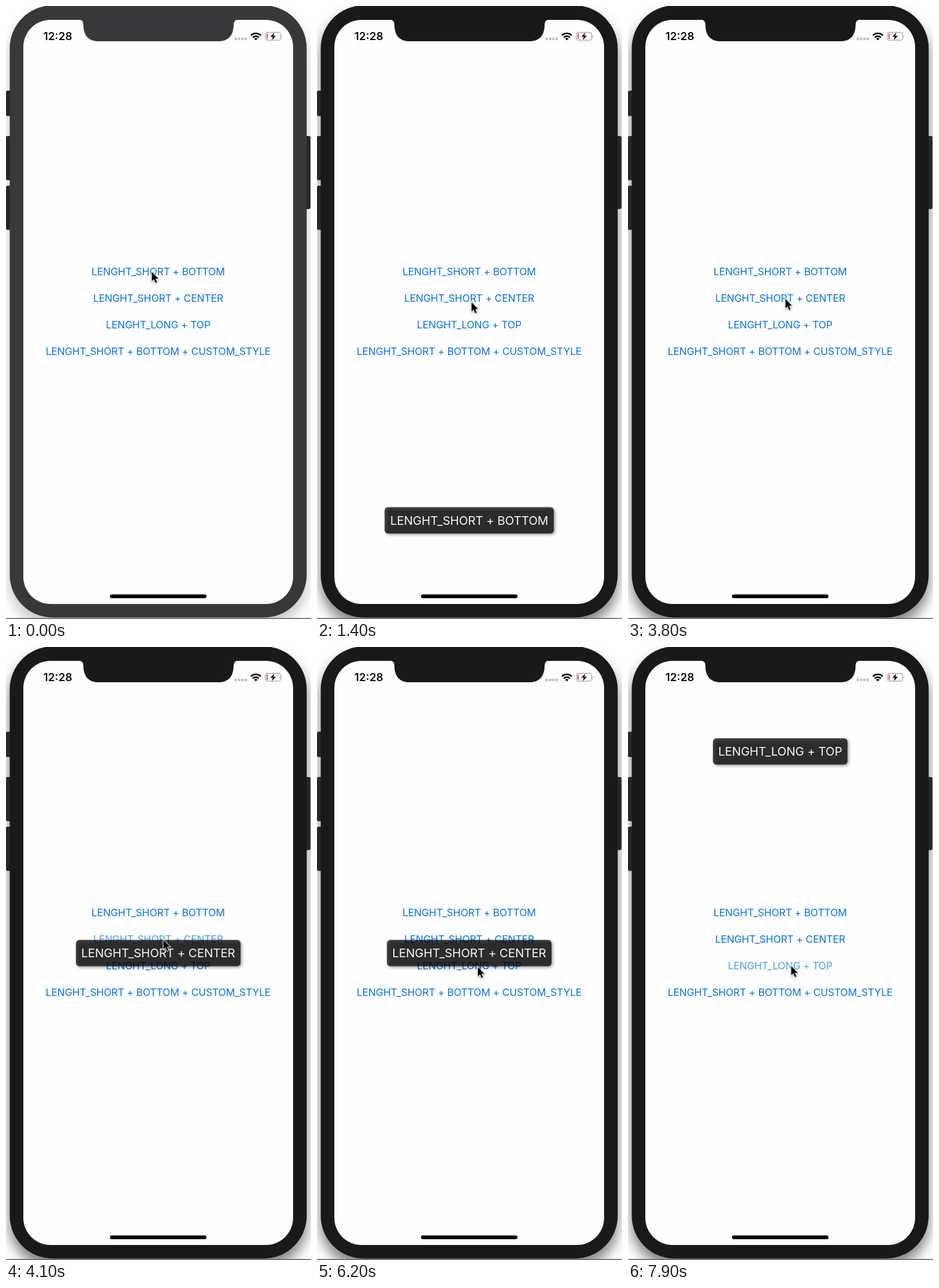
An HTML page that plays this animation: 528 px wide and 1061 px high, repeating every 8 s.

```html
<!DOCTYPE html>
<html lang="en">
<head>
<meta charset="utf-8">
<title>Toast demo</title>
<style>
html, body { margin: 0; width: 528px; height: 1061px; overflow: hidden; background: #fff; }
svg { display: block; }
text { font-family: Inter, Roboto, sans-serif; text-anchor: middle; }

.case, .shadow, .button, .toast { animation: 8s steps(1, end) infinite; }
.case { animation-name: focus; }
.shadow { filter: blur(11px); animation-name: deepen; }

.button {
  font-size: 17.4px; letter-spacing: -.13px; fill: #0572e3;
  animation-delay: calc(var(--at, 0s) - 8s);
}
.press { animation-name: press; }

.toast { opacity: 0; animation-name: toast; animation-delay: calc(var(--at, 0s) - 8s); }
.toast.late { animation-name: late; }
.toast text { font-size: 20.6px; letter-spacing: -.15px; fill: #f4f3f5; }
.toast .cast { fill: #000; fill-opacity: .42; filter: blur(2.5px); }
.toast .face { fill: #000; fill-opacity: .7; }

.cursor { animation: move 8s ease-in-out infinite; filter: drop-shadow(0 1.5px 1.5px rgba(0,0,0,.35)); }

@keyframes focus { 0% { fill: #39373a; } 1.25%, 100% { fill: #1a181b; } }
@keyframes deepen { 0% { opacity: .22; } 1.25%, 100% { opacity: .5; } }
@keyframes press {
  0% { opacity: 1; }
  1.25% { opacity: .25; }
  3.75% { opacity: .7; }
  5%, 100% { opacity: 1; }
}
@keyframes toast {
  0% { opacity: 0; }
  1.25% { opacity: .5; }
  2.5% { opacity: 1; }
  36.25% { opacity: .65; }
  37.5% { opacity: .25; }
  38.75%, 100% { opacity: 0; }
}
@keyframes late {
  0% { opacity: 0; }
  97.5% { opacity: .5; }
  98.75%, 100% { opacity: 1; }
}
@keyframes move {
  0%, 8.75% { transform: translate(252.5px, 460px); }
  15%, 19% { transform: translate(267.5px, 512.5px); }
  25%, 70% { transform: translate(272.5px, 506.8px); }
  78%, 90% { transform: translate(278.5px, 554px); }
  94%, 100% { transform: translate(282.5px, 552px); }
}
</style>
</head>
<body>
<svg width="528" height="1061" viewBox="0 0 528 1061">
  <rect class="shadow" x="6" y="13" width="515" height="1060" rx="74"/>
  <rect y="1059.3" width="528" height="1.7" fill="#6b6a6c"/>

  <g fill="#272628" stroke="#121113" stroke-width=".8">
    <rect x=".4" y="147" width="10" height="43" rx="2"/>
    <rect x=".4" y="225.500" width="10" height="75.500" rx="2"/>
    <rect x=".4" y="311.500" width="10" height="75.500" rx="2"/>
    <rect x="516" y="225.500" width="10.600" height="125.500" rx="2"/>
  </g>
  <rect class="case" x="6.500" y="-1" width="514" height="1059.500" rx="74"/>
  <rect x="30" y="24" width="467" height="1011" rx="47" fill="#fefdff"/>
  <path class="case" d="M126 23.500Q134 24 134 32C134 51 143 61 160 61H368C385 61 394 51 394 32Q394 24 402 23.500Z"/>

  <text x="89.700" y="59" font-size="19" font-weight="600" fill="#0b0a0c">12:28</text>
  <g fill="#c3c2c4">
    <circle cx="397.800" cy="57" r="2.400"/>
    <circle cx="403.600" cy="57" r="2.400"/>
    <circle cx="409.300" cy="57" r="2.400"/>
    <circle cx="415" cy="57" r="2.400"/>
  </g>
  <g fill="none" stroke="#0b0a0c" stroke-width="2.800">
    <path d="M424 51A12 12 0 0 1 441 51"/>
    <path d="M427.200 54.400A7.400 7.400 0 0 1 437.800 54.400"/>
  </g>
  <path d="M429.500 56.600A4.300 4.300 0 0 1 435.500 56.600L432.500 59.600Z" fill="#0b0a0c"/>
  <rect x="449" y="45.600" width="26.500" height="13.600" rx="3.800" fill="none" stroke="#a09fa1" stroke-width="1.200"/>
  <path d="M477 50.200Q479 52.400 477 54.600Z" fill="#a09fa1"/>
  <rect x="451" y="47.600" width="1.900" height="9.600" rx=".9" fill="#e2453c"/>
  <path d="M464.300 46L457.500 53.300H461.700L460.300 59L467.200 51.500H463Z" fill="#0b0a0c"/>

  <text class="button press" x="263.500" y="466.400">LENGHT_SHORT + BOTTOM</text>
  <text class="button press" style="--at:3.800s" x="263.500" y="512.400">LENGHT_SHORT + CENTER</text>
  <text class="button press" style="--at:7.600s" x="263.500" y="558.400">LENGHT_LONG + TOP</text>
  <text class="button" x="263.500" y="604.400">LENGHT_SHORT + BOTTOM + CUSTOM_STYLE</text>

  <g class="toast">
    <rect class="cast" x="119" y="869.500" width="293" height="45.500" rx="6"/>
    <rect class="face" x="117" y="867.500" width="293" height="45.500" rx="6"/>
    <text x="263.500" y="897.800">LENGHT_SHORT + BOTTOM</text>
  </g>
  <g class="toast" style="--at:3.800s">
    <rect class="cast" x="123" y="509" width="285" height="45.500" rx="6"/>
    <rect class="face" x="121" y="507" width="285" height="45.500" rx="6"/>
    <text x="263.500" y="537.300">LENGHT_SHORT + CENTER</text>
  </g>
  <g class="toast late">
    <rect class="cast" x="149" y="160" width="233" height="45.500" rx="6"/>
    <rect class="face" x="147" y="158" width="233" height="45.500" rx="6"/>
    <text x="263.500" y="188.300">LENGHT_LONG + TOP</text>
  </g>

  <rect x="180" y="1018.500" width="167" height="6.500" rx="3.250"/>
  <g class="cursor">
    <path d="M0 0V16.300L3.700 12.900L6.400 19.300L9 18.200L6.300 11.900H11.300Z" stroke="#fff" stroke-width="2" paint-order="stroke"/>
  </g>
</svg>
</body>
</html>
```
